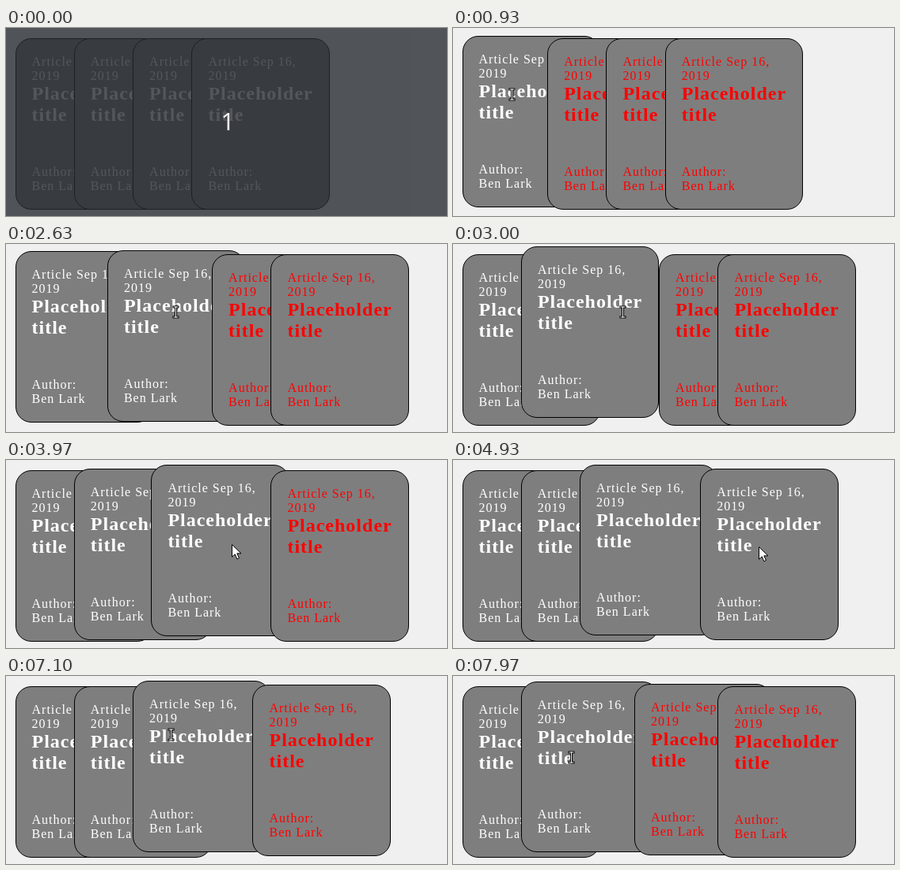
These frames come from a looping animation (557 by 239 pixels, 8 s). An HTML page:

```html
<!DOCTYPE html>
<html lang="en">
<head>
<meta charset="utf-8">
<title>Stacked cards</title>
<style>
  html, body { margin: 0; width: 100%; height: 100%; overflow: hidden; }
  body { position: relative; background: #f0f0f0; }
  .card {
    position: absolute;
    box-sizing: border-box;
    width: 174.3px;
    height: 217.9px;
    padding: 20px;
    border: 1px solid #000;
    border-radius: 20px;
    background: #7e7e7e;
    color: #fff;
    font: 16px/18px "Liberation Serif", "Times New Roman", serif;
    letter-spacing: 1px;
    white-space: nowrap;
  }
  .card h2 { margin: 0 0 49.9px; font-size: 24px; line-height: 27px; }
  .card.after { color: #f00; }
  #cursor { position: absolute; left: 0; top: 0; width: 24px; height: 24px; overflow: visible; }
  #beam { fill: none; stroke-linecap: square; }
  #shade {
    position: absolute;
    inset: 0;
    background: rgba(38, 42, 48, .79);
    color: #f4f4f4;
    font: 30px/30px "Noto Sans", "Open Sans", sans-serif;
  }
  #shade span { position: absolute; left: 260px; top: 104px; width: 40px; text-align: center; }
</style>
</head>
<body>
<svg id="cursor">
  <path id="arrow" d="M.5 .5V16.2L4.2 12.8L6.8 18.8L9.4 17.6L6.8 11.8H12Z"
        fill="#fff" stroke="#000" stroke-linejoin="round"/>
  <g id="beam">
    <path d="M-2.5 -6.5h5m-2.5 0v13m-2.5 0h5" stroke="#000" stroke-width="3"/>
    <path d="M-2.5 -6.5h5m-2.5 0v13m-2.5 0h5" stroke="#fff"/>
  </g>
</svg>
<div id="shade"><span>1</span></div>
<script>
  const LOOP = 8000, SHADE_END = 30;
  const SLIDE = 600, MOVE = 200;
  const LEFT = 11.5, TOP = 13.4, PITCH = 74.3, SPREAD = 100, LIFT = 10;

  // Each visit: when the pointer enters a card, which one, and where it comes to rest
  const visits = [
    { t: 800, card: 0, x: 74, y: 84 },
    { t: 2429, card: 1, x: 214, y: 86 },
    { t: 3690, card: 2, x: 285, y: 107, arrow: true },
    { t: 4830, card: 3, x: 386, y: 110, arrow: true },
    { t: 6530, card: 3, x: 280, y: 69 },
    { t: 6818, card: 2, x: 208, y: 74 },
    { t: 7727, card: 1, x: 149, y: 103 }
  ];

  const byId = id => document.getElementById(id);
  const cursor = byId("cursor"), arrow = byId("arrow"), beam = byId("beam"), shade = byId("shade");
  const show = (el, on) => { el.style.display = on ? "" : "none"; };
  const mix = (a, b, p) => a + (b - a) * p;

  const cards = [0, 1, 2, 3].map(() => {
    const card = document.createElement("div");
    card.className = "card";
    card.innerHTML = "Article Sep 16,<br>2019<h2>Placeholder<br>title</h2>Author:<br>Ben Lark";
    document.body.insertBefore(card, cursor);
    return card;
  });

  // CSS "ease": cubic-bezier(.25, .1, .25, 1)
  function ease(x) {
    if (x <= 0) return 0;
    if (x >= 1) return 1;
    const curve = (u, a, b) => 3 * u * (1 - u) ** 2 * a + 3 * u * u * (1 - u) * b + u ** 3;
    let lo = 0, hi = 1;
    for (let i = 0; i < 24; i++) {
      const mid = (lo + hi) / 2;
      if (curve(mid, .25, .25) < x) lo = mid; else hi = mid;
    }
    return curve(lo, .1, 1);
  }

  const isAfter = (i, visit) => !!visit && i > visit.card;
  const pose = (i, visit) => ({
    x: LEFT + i * PITCH + (isAfter(i, visit) ? SPREAD : 0),
    y: TOP - (visit && i === visit.card ? LIFT : 0)
  });

  function drawCards(t) {
    const n = visits.findLastIndex(v => v.t <= t);
    const now = visits[n], before = visits[n - 1];
    const p = now ? ease((t - now.t) / SLIDE) : 0;
    cards.forEach((card, i) => {
      const a = pose(i, before), b = pose(i, now);
      card.style.left = mix(a.x, b.x, p) + "px";
      card.style.top = mix(a.y, b.y, p) + "px";
      card.classList.toggle("after", isAfter(i, now));
    });
  }

  // The pointer is halfway through its move when it enters the card
  function drawCursor(t) {
    show(cursor, t >= visits[0].t);
    const n = Math.max(0, visits.findLastIndex(v => v.t - MOVE / 2 <= t));
    const to = visits[n], from = visits[n - 1] || to;
    const p = ease((t - to.t) / MOVE + .5);
    const x = Math.round(mix(from.x, to.x, p)), y = Math.round(mix(from.y, to.y, p));
    const pointing = !!(t < to.t ? from : to).arrow;
    const half = pointing ? 0 : .5;
    cursor.style.transform = `translate(${x + half}px, ${y + half}px)`;
    show(arrow, pointing);
    show(beam, !pointing);
  }

  function draw(t) {
    drawCards(t);
    drawCursor(t);
    show(shade, t < SHADE_END);
  }

  let origin;
  function tick(now) {
    origin ??= now;
    draw((now - origin) % LOOP);
    requestAnimationFrame(tick);
  }
  draw(0);
  requestAnimationFrame(tick);
</script>
</body>
</html>
```
